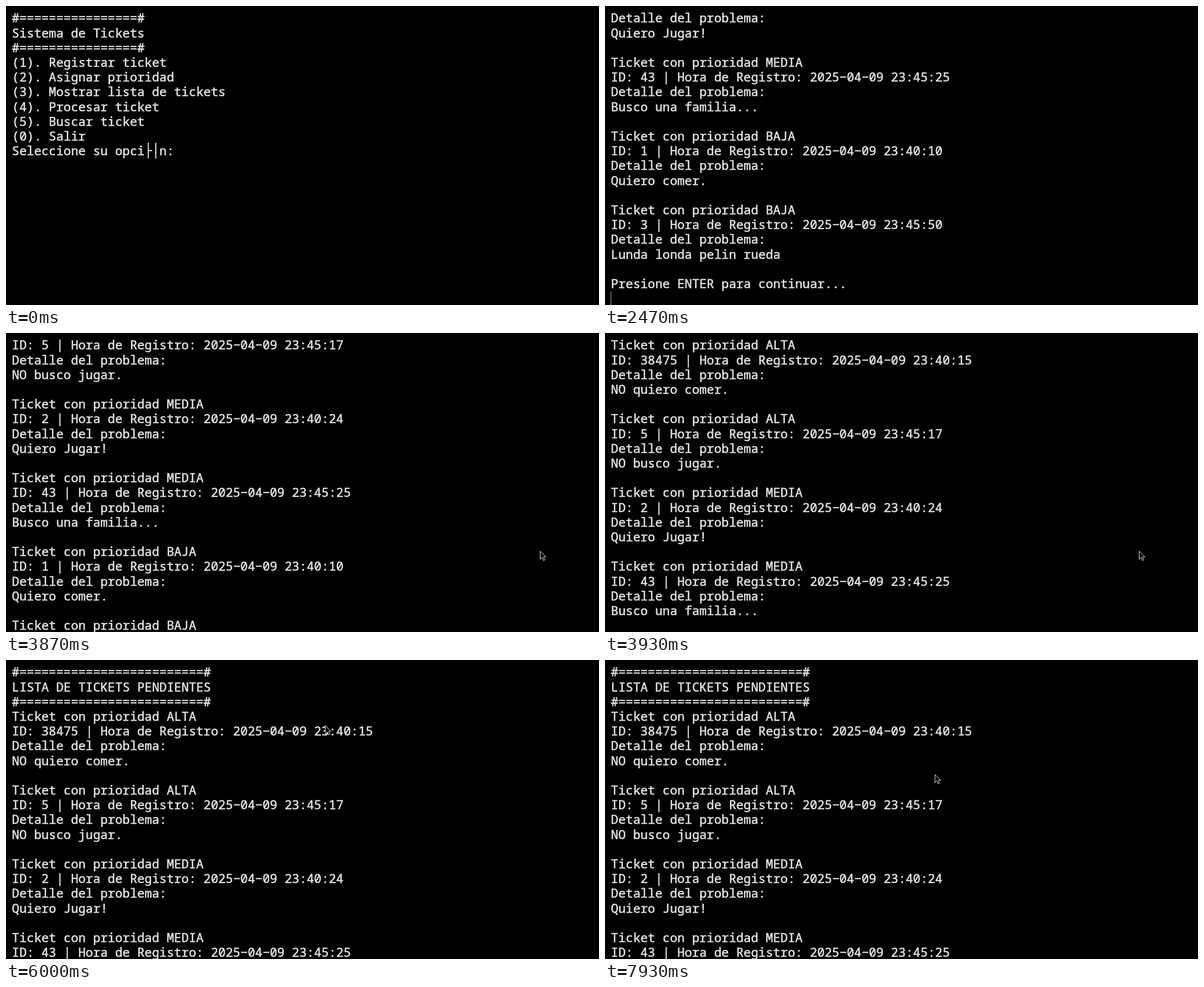
These frames come from a looping animation (1054x531 px, 8 s). An HTML page with a canvas:

```html
<!DOCTYPE html>
<html lang="es">
<meta charset="utf-8">
<title>Sistema de Tickets</title>
<style>
  html, body { margin: 0; height: 100%; overflow: hidden; background: #000; }
  canvas { display: block; }
</style>
<canvas width="1054" height="531"></canvas>
<script>
const ctx = document.querySelector('canvas').getContext('2d');
const LOOP = 8000, TICK = 1000 / 15;
const LEFT = 10.6, TOP = 9, CELL = 13.1, ROW = 26.2, BASELINE = 20.3, ROWS = 20;
const INK = '#e2e3e6';

// Times in ticks
const TYPED = 33, ENTERED = 37, SCROLLED = 57;

const heading = title => {
  const rule = '#' + '='.repeat(title.length - 2) + '#';
  return [rule, title, rule];
};

const menu = [
  ...heading('Sistema de Tickets'),
  '(1). Registrar ticket',
  '(2). Asignar prioridad',
  '(3). Mostrar lista de tickets',
  '(4). Procesar ticket',
  '(5). Buscar ticket',
  '(0). Salir',
  'Seleccione su opci├│n:',
];

const ticket = (priority, id, time, detail) => [
  `Ticket con prioridad ${priority}`,
  `ID: ${id} | Hora de Registro: 2025-04-09 ${time}`,
  'Detalle del problema:',
  detail,
  '',
];

const list = [
  ...heading('LISTA DE TICKETS PENDIENTES'),
  ...ticket('ALTA', 38475, '23:40:15', 'NO quiero comer.'),
  ...ticket('ALTA', 5, '23:45:17', 'NO busco jugar.'),
  ...ticket('MEDIA', 2, '23:40:24', 'Quiero Jugar!'),
  ...ticket('MEDIA', 43, '23:45:25', 'Busco una familia...'),
  ...ticket('BAJA', 1, '23:40:10', 'Quiero comer.'),
  ...ticket('BAJA', 3, '23:45:50', 'Lunda londa pelin rueda'),
  'Presione ENTER para continuar...',
];

// The pointer enters from the right and rests between moves
const entry = { start: 49, x: 1046, y: 440 };
const moves = [
  { start: 49, end: 55, x: 949, y: 387 },
  { start: 68, end: 73, x: 670, y: 247 },
  { start: 77, end: 85, x: 320, y: 199 },
  { start: 87, end: 90, x: 567, y: 116 },
  { start: 90, end: 94, x: 619, y: 122 },
  { start: 94, end: 104, x: 510, y: 86 },
  { start: 104, end: 113, x: 705, y: 138 },
  { start: 113, end: 119, x: 586, y: 203 },
];
const arrow = new Path2D('M.5.5V15L4 11.7 6.4 17 8.7 16 6.3 10.8H10.6Z');

const clamp = (v, low, high) => Math.min(high, Math.max(low, v));
const ease = k => k * k * (3 - 2 * k);
const caretOn = age => age % 16.5 < 8.5;

function pointerAt(tick) {
  let { x, y } = entry;
  for (const move of moves) {
    const k = ease(clamp((tick - move.start) / (move.end - move.start), 0, 1));
    x += (move.x - x) * k;
    y += (move.y - y) * k;
  }
  return [Math.round(x), Math.round(y)];
}

function drawLines(lines) {
  ctx.fillStyle = ctx.strokeStyle = INK;
  ctx.lineWidth = .6;
  ctx.font = '21.83px "Noto Sans Mono", "DejaVu Sans Mono", monospace';
  lines.forEach((line, row) => {
    // The terminal face is sturdy, with wide hyphens
    const args = [line.replaceAll('-', '−'), LEFT, TOP + BASELINE + row * ROW];
    ctx.fillText(...args);
    ctx.strokeText(...args);
  });
}

function drawCaret(column, row) {
  ctx.fillStyle = '#a0a0a0';
  ctx.fillRect(Math.round(LEFT + column * CELL - .6), Math.round(TOP + row * ROW), 1, 26);
}

function drawPointer(x, y) {
  ctx.save();
  ctx.translate(x, y);
  ctx.fillStyle = '#000';
  ctx.strokeStyle = '#e4e4e4';
  ctx.lineWidth = 1;
  ctx.fill(arrow);
  ctx.stroke(arrow);
  ctx.restore();
}

function draw(tick) {
  ctx.fillStyle = '#000';
  ctx.fillRect(0, 0, 1054, 531);

  if (tick < ENTERED) {
    const input = tick < TYPED ? '' : '3';
    drawLines([...menu, input]);
    if (caretOn(tick + 15.5)) drawCaret(input.length, menu.length);
  } else {
    const first = clamp(15 - 6 * (tick - SCROLLED), 0, 15);
    drawLines(list.slice(first, first + ROWS));
    if (tick <= SCROLLED && caretOn(tick - ENTERED)) drawCaret(0, list.length - first);
  }

  if (tick >= entry.start) drawPointer(...pointerAt(tick));
}

function loop() {
  draw(Math.floor((performance.now() % LOOP + 4) / TICK) % 120);
  requestAnimationFrame(loop);
}
loop();
</script>
</html>
```
